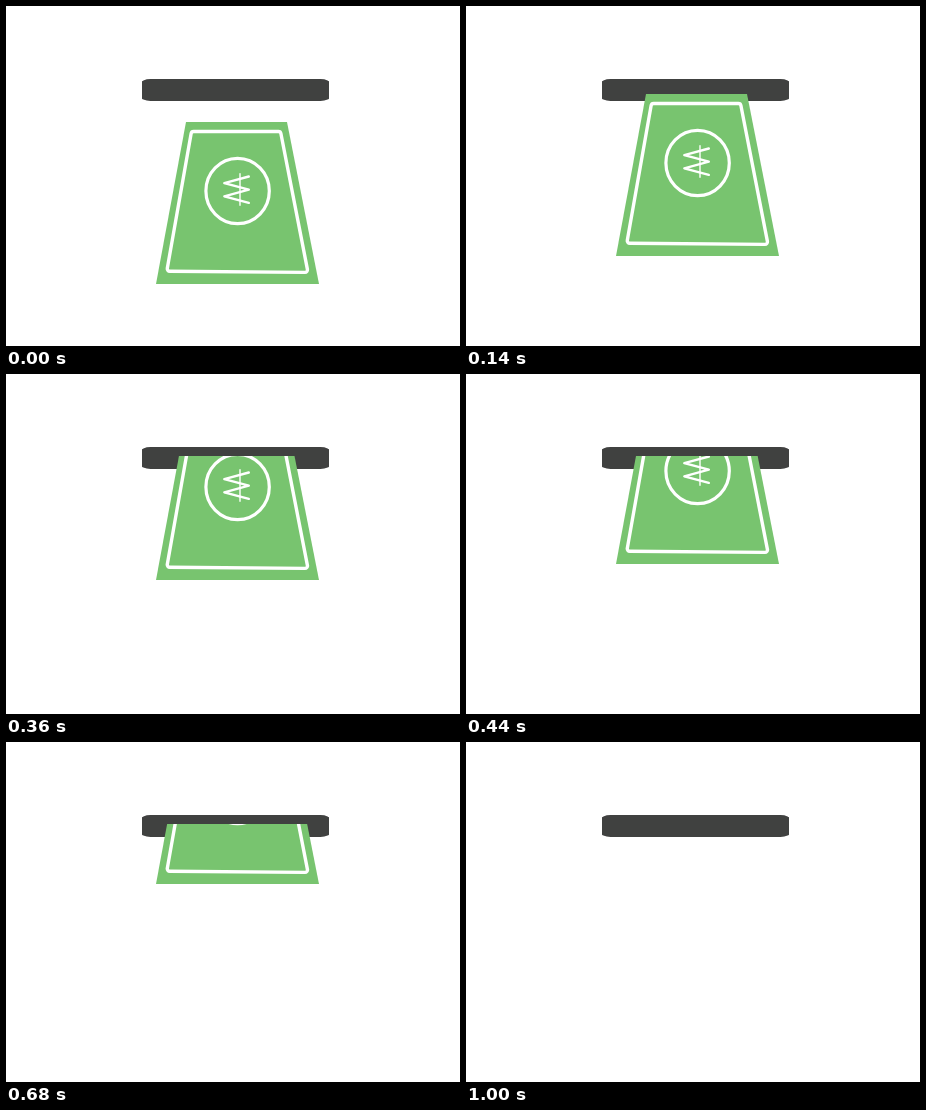
An HTML page with a canvas for the animation above (1820 ms loop, 454 by 340 pixels).

```html
<!DOCTYPE html>
<html lang="en">
<head>
<meta charset="utf-8">
<title>Banknote slot</title>
<style>
  html, body { margin: 0; width: 100%; height: 100%; overflow: hidden; background: #fff; }
  canvas { display: block; }
</style>
</head>
<body>
<canvas id="stage"></canvas>
<script>
const W = 454, H = 340;
const LOOP = 1820, TRAVEL = 1000, STEP = 20, SPEED = 0.2;
const SLOT = { x: 136, y: 73, w: 187, h: 22, mouth: 82 };

const canvas = document.getElementById('stage');
canvas.width = W;
canvas.height = H;
const ctx = canvas.getContext('2d');

// Runs paint inside a clipping box
function inside(x, y, w, h, paint) {
  ctx.save();
  ctx.beginPath();
  ctx.rect(x, y, w, h);
  ctx.clip();
  paint();
  ctx.restore();
}

// Four-sided path with level top, optional tilt of the bottom and rounded corners
function quad(top, topL, topR, bottom, botL, botR, tilt = 0, radius = 0) {
  const p = [[topL, top], [topR, top], [botR, bottom + tilt], [botL, bottom]];
  ctx.beginPath();
  ctx.moveTo((topL + topR) / 2, top);
  for (let i = 1; i <= 4; i++) ctx.arcTo(...p[i % 4], ...p[(i + 1) % 4], radius);
  ctx.closePath();
}

function stroke(width) {
  ctx.lineWidth = width;
  ctx.stroke();
}

function drawSlot() {
  const bleed = 1.5;
  ctx.fillStyle = '#404140';
  ctx.beginPath();
  ctx.roundRect(SLOT.x - bleed, SLOT.y, SLOT.w + 2 * bleed, SLOT.h, { x: 10, y: 5 });
  ctx.fill();
}

// Won sign turned on its side: a zigzag crossed by one thin bar
function drawWon(cx, cy) {
  ctx.beginPath();
  for (let i = -2; i <= 2; i++) {
    ctx.lineTo(cx + (i % 2 ? -12.5 : 12), cy + i * 6.6);
  }
  stroke(2.4);
  ctx.beginPath();
  ctx.moveTo(cx + 3.2, cy - 16);
  ctx.lineTo(cx + 3.2, cy + 15.5);
  stroke(1.4);
}

function drawNote() {
  ctx.fillStyle = '#78c46f';
  quad(116, 180, 281, 278, 150, 313);
  ctx.fill();

  ctx.strokeStyle = '#fff';
  ctx.lineCap = ctx.lineJoin = 'round';
  quad(125.5, 185.5, 274.5, 265.2, 160.8, 302, 1.2, 2.5);
  stroke(3.4);

  ctx.beginPath();
  ctx.ellipse(231.6, 185, 31.7, 32.6, 0, 0, Math.PI * 2);
  stroke(3.2);
  drawWon(230.8, 183.7);
}

function draw(now) {
  const t = Math.min(now % LOOP, TRAVEL);
  const lift = Math.floor(t / STEP) * STEP * SPEED;

  ctx.fillStyle = '#fff';
  ctx.fillRect(0, 0, W, H);
  inside(SLOT.x, SLOT.y, SLOT.w, SLOT.h, drawSlot);
  inside(0, SLOT.mouth, W, H, () => {
    ctx.translate(0, -lift);
    drawNote();
  });
}

const start = performance.now();
function tick() {
  draw(performance.now() - start);
  requestAnimationFrame(tick);
}
tick();
</script>
</body>
</html>
```
